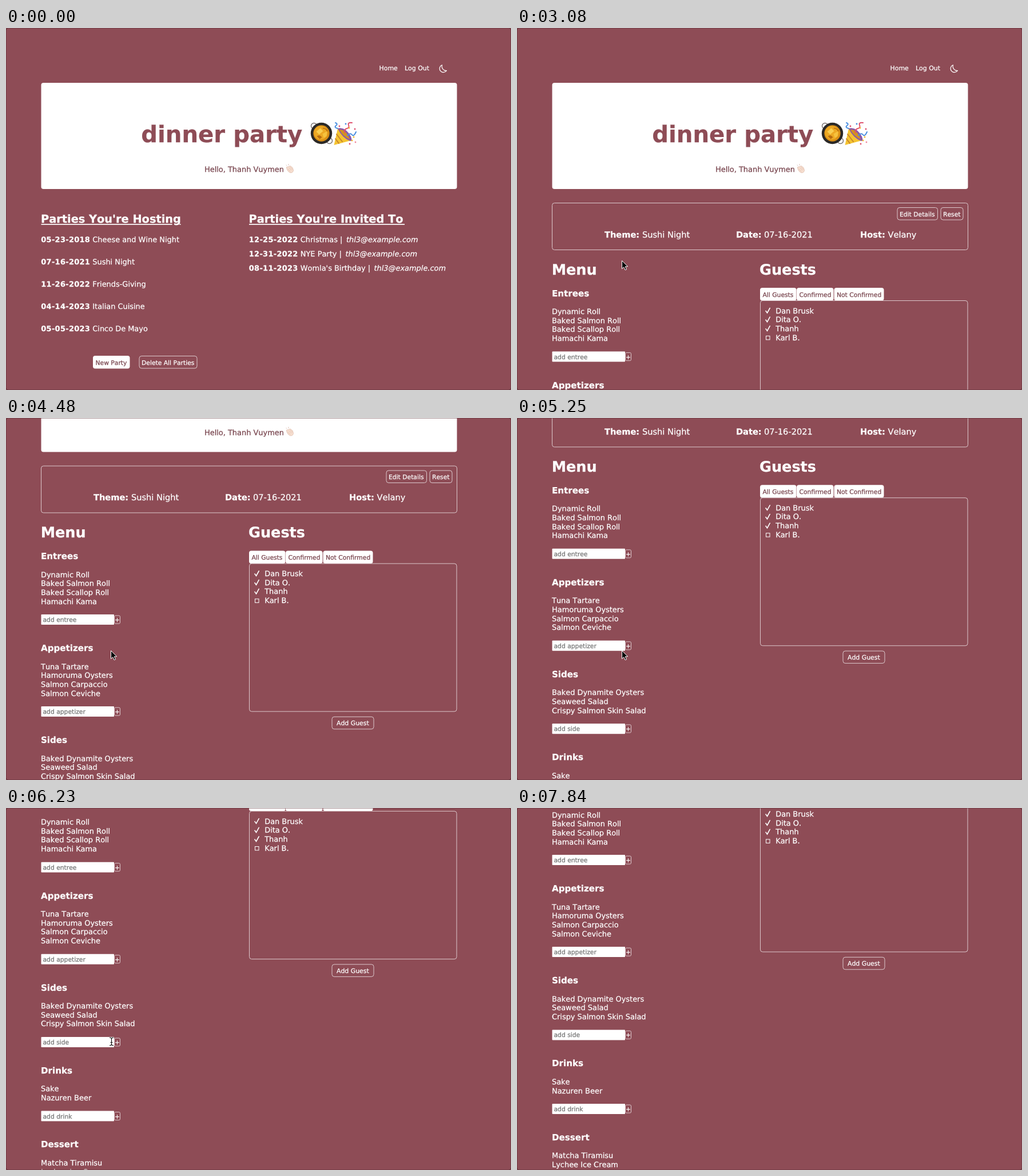
Recreate the animation shown at these times as an HTML page. Size 883 by 634 pixels, loop 8000 ms.

```html
<!DOCTYPE html>
<html lang="en">
<head>
<meta charset="utf-8">
<title>dinner party</title>
<style>
html, body { margin: 0; width: 100%; height: 100%; overflow: hidden; background: #8e4c56; }
svg { display: block; width: 883px; height: 634px; }
text {
  font-family: "DejaVu Sans", Verdana, sans-serif; font-kerning: none; text-rendering: geometricPrecision;
  color: #fff; fill: currentColor; stroke: currentColor; stroke-width: .25px;
}
.b { font-weight: 700; }
.i { font-style: italic; }
.m { color: #8e4c56; }
.d { color: #77434c; }
.g { color: #757575; }
.date { font-weight: 700; letter-spacing: .32px; }
.line { fill: none; stroke: #dcc8cc; }
</style>
</head>
<body>
<svg id="stage" viewBox="0 0 883 634"></svg>
<script>
const BODY = 12.93, BUTTON = 10.75, ROW = 15.7, LOOP = 8000, STEP = 70;

const text = (x, y, str, size = BODY, cls = '') =>
  `<text x="${x}" y="${y}" font-size="${size}" class="${cls}">${str}</text>`;
const box = (x, y, w, h, r = 4, attrs = 'fill="#fff"') =>
  `<rect x="${x}" y="${y}" width="${w}" height="${h}" rx="${r}" ${attrs}/>`;
const outline = (x, y, w, h, r = 4) => box(x, y, w, h, r, 'class="line"');
const path = (d, attrs) => `<path d="${d}" ${attrs}/>`;
const stroke = (color, width = 1) => `fill="none" stroke="${color}" stroke-width="${width}" stroke-linecap="round"`;

function button(x, y, w, label, pad = 4.5, filled = false, size = BUTTON) {
  return (filled ? box(x, y, w, 22.5) : outline(x + .5, y + .5, w - 1, 21.5)) +
    text(x + pad, y + 15.5, label, size, filled ? 'd' : '');
}

function pan() {
  return `<g transform="translate(551.5 184.5)">
    <circle cx="-13" cy="-13" r="5" ${stroke('#77706f', 1.4)}/>
    <circle cx="14" cy="13" r="5" ${stroke('#77706f', 1.4)}/>
    <circle r="18.7" fill="#2b2927"/>
    <circle r="14.2" fill="#d98f16"/>
    <circle cx="-1" cy="-1" r="12" fill="#eda823"/>
    ${path('M-9 -3L-2 -9L3 -4L-4 2Z', 'fill="#f9cf52"')}
    ${path('M2 1L10 -4L9 5L4 8Z', 'fill="#f6c23e"')}
    ${path('M-8 5Q-3 1 1 7L-3 10Z', 'fill="#b86c10"')}
    ${path('M3 -9Q9 -8 10 -4', stroke('#b86c10', 1.6))}
  </g>`;
}

function popper() {
  const dots = [[583, 172, '#e0506d'], [594, 168, '#4b8fe0'], [600, 175, '#f2b632'], [610, 177, '#e0506d'],
    [608, 191, '#f2b632'], [611, 200, '#f08a9c'], [601, 203, '#e0506d'], [605, 197, '#f2b632']];
  return path('M573.5 205L580 176Q592 178 603 197Z', 'fill="#f5c431"') +
    path('M578 186L588 199M576 194L582 202', stroke('#c9862c', 2)) +
    path('M580 176Q593 172 603 190Q606 198 602 198Q588 193 580 176', 'fill="#8b59a8"') +
    path('M583 178Q594 177 601 195Q589 190 583 178', 'fill="#d3921f"') +
    path('M576 166q5 2 1 5t3 5', stroke('#4b8fe0', 2)) +
    path('M592 183q-1-6 4-7t3-6 6-4', stroke('#e0506d', 2)) +
    path('M597 188q5-5 8-1t7-5', stroke('#4b8fe0', 2)) +
    dots.map(([x, y, c]) => `<circle cx="${x}" cy="${y}" r="1.4" fill="${c}"/>`).join('');
}

function clappingHand() {
  return path('M491 247L490.500 243.500L493 243L497 241.500L501 244.500L502.500 249Q502 254 497 253.500Q493 252 491 247Z',
      'fill="#f7dfd0" stroke="#dcb7a6" stroke-width=".7"') +
    path('M493 247l4 4M495 245l4 4M497 243.500l3.500 4', stroke('#dcb7a6', .7)) +
    path('M491 241l-1-1M494 240v-1.500', stroke('#cfa79a', .8));
}

function header() {
  return text(652.5, 73.8, 'Home', 10.95) + text(697, 73.8, 'Log Out', 10.95) +
    path('M762.500 64.800A6.600 6.600 0 1 0 770.300 74.600A7.500 7.500 0 0 1 762.500 64.800Z',
      'fill="none" stroke="#fff" stroke-width="1.2" stroke-linejoin="round"') +
    box(61.5, 96, 727, 186) +
    text(236.3, 200, 'dinner party', 40.2, 'b m') + pan() + popper() +
    text(347, 252, 'Hello, Thanh Vuymen', BODY, 'd') + clappingHand();
}

function homePage() {
  const hosting = [['05-23-2018', 'Cheese and Wine Night'], ['07-16-2021', 'Sushi Night'],
    ['11-26-2022', 'Friends-Giving'], ['04-14-2023', 'Italian Cuisine'], ['05-05-2023', 'Cinco De Mayo']];
  const invited = [['12-25-2022', 'Christmas |', 595], ['12-31-2022', 'NYE Party |', 593.5],
    ['08-11-2023', "Womla's Birthday |", 643.5]];
  const party = (x, y, [date, name]) => text(x, y, date, BODY, 'date') + text(x + 90, y, name);
  return text(61, 341.2, "Parties You're Hosting", 19.35, 'b') +
    box(61.5, 343, 229, 1.7, 0) + box(303.5, 343, 2, 1.7, 0) +
    text(424.5, 341.2, "Parties You're Invited To", 19.35, 'b') + box(425, 343, 272, 1.7, 0) +
    hosting.map((p, i) => party(61.3, 374.5 + i * 39.2, p)).join('') +
    invited.map((p, i) => {
      const y = 374.5 + i * 25.2;
      return party(424.8, y, p) + text(p[2], y, 'thl3@example.com', BODY, 'i');
    }).join('') +
    button(152, 574, 64.5, 'New Party', 4.5, true) + button(232.5, 574, 102, 'Delete All Parties');
}

function menu() {
  const sections = [
    ['Entrees', 'entree', ['Dynamic Roll', 'Baked Salmon Roll', 'Baked Scallop Roll', 'Hamachi Kama']],
    ['Appetizers', 'appetizer', ['Tuna Tartare', 'Hamoruma Oysters', 'Salmon Carpaccio', 'Salmon Ceviche']],
    ['Sides', 'side', ['Baked Dynamite Oysters', 'Seaweed Salad', 'Crispy Salmon Skin Salad']],
    ['Drinks', 'drink', ['Sake', 'Nazuren Beer']],
    ['Dessert', 'dessert', ['Matcha Tiramisu', 'Lychee Ice Cream']]];
  let y = 469.5, out = '';
  for (const [title, kind, items] of sections) {
    const input = y + 34.3 + items.length * ROW;
    out += text(61, y, title, 15.1, 'b') +
      items.map((item, i) => text(61, y + 31.5 + i * ROW, item)).join('') +
      box(61.5, input, 127.5, 18, 1) + text(64.5, input + 13, 'add ' + kind, BUTTON, 'g') +
      outline(189.5, input + 2, 10, 14, 2) + text(190, input + 13, '+', BUTTON);
    y += 98.2 + items.length * ROW;
  }
  return out;
}

function guests() {
  const names = ['Dan Brusk', 'Dita O.', 'Thanh', 'Karl B.'];
  return button(425, 455, 63.5, 'All Guests', 4.5, true) + button(489, 455, 64.5, 'Confirmed', 4.5, true) +
    button(554.5, 455, 87, 'Not Confirmed', 4.5, true) +
    outline(425.5, 477.5, 362.5, 259) +
    names.map((name, i) => {
      const y = 499.5 + i * ROW;
      const mark = i < 3 ? path(`M435 ${y - 4}l2.500 3.500l4.700 -8.500`, stroke('#fff', 1.6))
        : box(435.5, y - 7.2, 6.5, 6.5, 0, stroke('#fff'));
      return mark + text(452.2, y, name);
    }).join('') +
    button(569.5, 745.3, 74, 'Add Guest', 8.5, false, 10.9);
}

function partyPage() {
  const details = [[153, 219, 'Theme:', 'Sushi Night'], [383, 432, 'Date:', '07-16-2021'], [600, 648.5, 'Host:', 'Velany']];
  return outline(61.5, 306.5, 727, 82) +
    button(664.5, 314, 71.5, 'Edit Details') + button(740.5, 314, 40, 'Reset') +
    details.map(([x, valueX, label, value]) =>
      text(x, 366.5, label, 14.6, 'b') + text(valueX, 366.5, value, 14.6)).join('') +
    text(60.7, 431.5, 'Menu', 25.5, 'b') + text(424, 431.5, 'Guests', 25.5, 'b') +
    menu() + guests();
}

const cursors = {
  arrow: path('M0 0V14.200L3.300 11.200L5.600 16.300L8 15.300L5.800 10.300H10.200Z', 'fill="#000" stroke="#fff"'),
  hand: path('M-1.200 8V1.200Q0 -.5 1.200 1.200V5.500Q3 4.500 4 6Q6 5 6.800 6.800Q9 6 9 8.500Q9 12 7.200 15H.5L-3.500 9.500Q-3.500 7.500 -1.200 8Z',
    'fill="#fff" stroke="#000"'),
  ibeam: ['stroke="#fff" stroke-width="2.6"', 'stroke="#000" stroke-width="1.1"'].map(s =>
    path('M-2.500 -5.500Q1 -5.500 1 -3V6Q1 8.500 -2.500 8.500M4.500 -5.500Q1 -5.500 1 -3V6Q1 8.500 4.500 8.500M-1 3H3', 'fill="none" ' + s)).join('')
};

const stage = document.getElementById('stage');
stage.innerHTML = `<g id="page">${header()}<g id="home">${homePage()}</g><g id="party">${partyPage()}</g></g>` +
  Object.entries(cursors).map(([name, shape]) => `<g id="${name}">${shape}</g>`).join('') +
  box(0, 0, 883, 634, 4, 'fill="none" stroke="#5d3038"');
const el = id => document.getElementById(id);
const show = (id, on) => el(id).setAttribute('display', on ? 'inline' : 'none');

// start, end, distance, sharpness of the initial flick
const flicks = [[3570, 4480, 222.5, .772], [4970, 6020, 247.5, .56], [6160, 6790, 24, .8], [6860, 7280, -9.5, .8]];

function scrollAt(t) {
  return flicks.reduce((sum, [start, end, distance, power]) => {
    const u = Math.min(1, Math.max(0, (t - start) / (end - start))) ** power;
    return sum + distance * u * u * (3 - 2 * u);
  }, 0);
}

function cursorAt(t) {
  if (t < 1680) return null;
  if (t < 1820) return ['arrow', 142.7, 410.5];
  if (t < 2520) return ['hand', 143.5, 410.5];
  if (t < 3080 || t >= 7840) return null;
  return [t >= 6230 && t < 7280 ? 'ibeam' : 'arrow', 183.5, 407.5];
}

function draw(now) {
  const t = Math.floor(now % LOOP / STEP) * STEP;
  el('page').setAttribute('transform', `translate(0 ${-scrollAt(t)})`);
  show('home', t < 2520);
  show('party', t >= 2520);
  const cursor = cursorAt(t);
  for (const name in cursors) show(name, cursor && cursor[0] === name);
  if (cursor) el(cursor[0]).setAttribute('transform', `translate(${cursor[1]} ${cursor[2]})`);
}

const begin = performance.now();
(function loop() {
  draw(performance.now() - begin);
  requestAnimationFrame(loop);
})();
</script>
</body>
</html>
```
